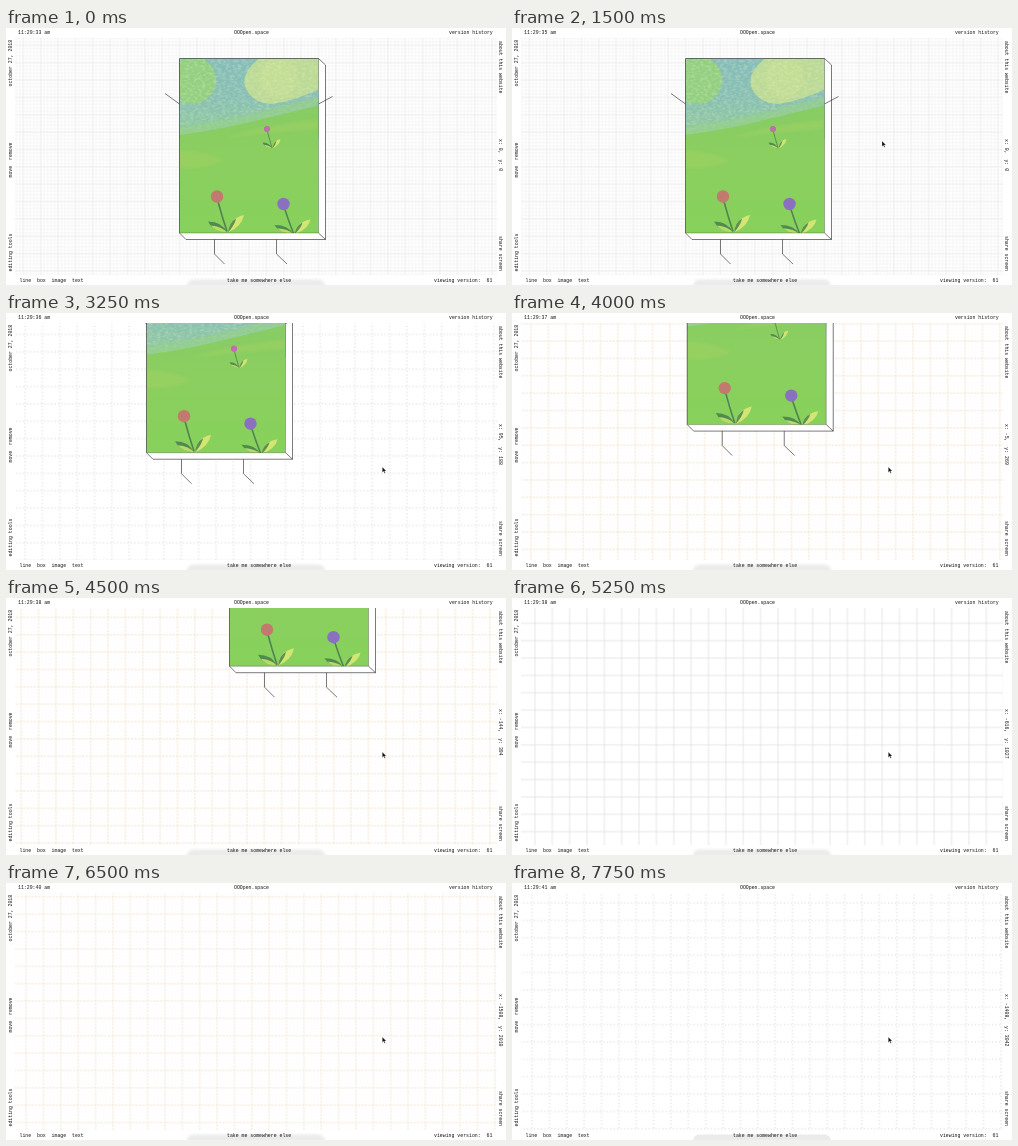
Write an HTML page that moves like this. It is 500 px wide and 257 px high and loops after 8000 ms.

```html
<!DOCTYPE html>
<html lang="en">
<head>
<meta charset="utf-8">
<title>Open space</title>
<style>
html, body { margin: 0; width: 100%; height: 100%; overflow: hidden; background: #fff; }
svg { display: block; width: 100vw; height: 100vh; }
text { font: 4.86px "Liberation Mono", "DejaVu Sans Mono", monospace; white-space: pre; fill: #111; }
.ink { fill: none; stroke: #222; stroke-width: .6; }
</style>
</head>
<body>
<svg viewBox="0 0 500 257" preserveAspectRatio="none">
  <defs>
    <clipPath id="view"><rect x="9" y="10" width="482" height="237"/></clipPath>
    <clipPath id="frame"><rect x="173.5" y="30.5" width="139" height="174.5"/></clipPath>
    <pattern id="cells" width="17.361" height="17.361" patternUnits="userSpaceOnUse">
      <path id="cellLine" d="M0 8.68H17.361M8.68 0V17.361" fill="none" stroke-width=".75"/>
    </pattern>
    <pattern id="fine" width="3.472" height="3.472" patternUnits="userSpaceOnUse">
      <path d="M0 1.736H3.472M1.736 0V3.472" fill="none" stroke="#e9e9e9" stroke-width=".5"/>
    </pattern>
    <linearGradient id="sky" x1="0" y1="0" x2="0" y2="1">
      <stop stop-color="#84bcba"/><stop offset=".5" stop-color="#88bfb4"/><stop offset="1" stop-color="#92cb9a"/>
    </linearGradient>
    <linearGradient id="hill" x1="0" y1="0" x2="0" y2="1">
      <stop stop-color="#87cc65"/><stop offset=".4" stop-color="#8bcf60"/><stop offset="1" stop-color="#87d15b"/>
    </linearGradient>
    <filter id="soft"><feGaussianBlur stdDeviation="1.8"/></filter>
    <filter id="paint"><feGaussianBlur stdDeviation=".35"/></filter>
    <filter id="grain" x="0" y="0" width="1" height="1">
      <feTurbulence type="fractalNoise" baseFrequency=".25 .4" numOctaves="3" seed="4"/>
      <feColorMatrix values="0 0 0 0 .8  0 0 0 0 .92  0 0 0 0 .6  1.8 0 0 0 -.7"/>
    </filter>
    <g id="plant" filter="url(#paint)">
      <path d="M1 5Q5 20 10 35" fill="none" stroke="#4f8450" stroke-width="1.6"/>
      <path d="M10 36Q-5 34 -9 25Q5 25 10 36" fill="#4f8a50"/>
      <path d="M10 36Q-2 35 -6 29Q5 30 10 36" fill="#b9d968"/>
      <path d="M11 36Q12 22 27 18.5Q25 30 11 36" fill="#d3e572"/>
      <path d="M11 36Q12 26 19 22Q18 28 11 36" fill="#5c9152"/>
    </g>
  </defs>

  <g clip-path="url(#view)">
    <rect id="fineGrid" width="500" height="257" fill="url(#fine)"/>
    <rect width="500" height="257" fill="url(#cells)"/>
    <g id="box">
      <path d="M173.5 30.5H312.5L319.5 37V211.5H180L173.5 205Z" fill="#fff"/>
      <g clip-path="url(#frame)">
        <rect x="173" y="30" width="140" height="80" fill="url(#sky)"/>
        <circle cx="186" cy="52" r="24" fill="#93cf81"/>
        <path d="M256 28Q235 44 239 58Q245 75 266 76Q292 72 315 60V28Z" fill="#bcd996" filter="url(#paint)"/>
        <circle cx="272" cy="50" r="20" fill="#c8df94" opacity=".6" filter="url(#soft)"/>
        <rect x="173" y="30" width="140" height="80" filter="url(#grain)" opacity=".4"/>
        <path d="M172 104Q205 100 235 93T314 73" fill="none" stroke="#96d089" stroke-width="9" opacity=".7" filter="url(#soft)"/>
        <path d="M172 107Q205 103 235 96T314 77V206H172Z" fill="url(#hill)"/>
        <g fill="#a0d164" opacity=".55" filter="url(#soft)">
          <path d="M172 122Q196 123 218 132Q196 143 172 139Z"/>
          <path d="M220 110Q250 98 312 92V101Q265 104 220 110"/>
        </g>
        <g id="plants"></g>
      </g>
      <path class="ink" d="M312.5 30.5V205H173.5" opacity=".5"/>
      <path class="ink" d="M173.5 205V30.5H312.5L319.5 37V211.5H180L173.5 205M312.5 205L319.5 211.5M159 65.5L173.5 76M312.5 76L326.5 68.5M208.5 211.5V226L218.5 236M270.5 211.5V226L281 236"/>
    </g>
  </g>

  <path id="dock" d="M181 259Q181 251.5 188 251.5H312Q319 251.5 319 259Z" fill="#ebebeb"/>
  <g id="labels"></g>
  <path id="cursor" d="M0 0V5.4L1.3 4.3L2.2 6.3L3.1 5.9L2.2 4H3.9Z" fill="#111" stroke="#fff" stroke-width=".25"/>
</svg>
<script>
const $ = id => document.getElementById(id);
const SCALE = 2.88, LOOP = 8000, STEP = 250;

function add(parent, tag, attrs, text = '') {
  const el = document.createElementNS('http://www.w3.org/2000/svg', tag);
  for (const k in attrs) el.setAttribute(k, attrs[k]);
  el.textContent = text;
  return $(parent).appendChild(el);
}

function label(text, x, y, angle = 0) {
  return add('labels', 'text', { transform: `translate(${x} ${y}) rotate(${angle})` }, text);
}

function flower(x, y, size, height, color) {
  const place = `translate(${x} ${y})`;
  add('plants', 'use', { href: '#plant', transform: `${place} scale(${size} ${height})` });
  add('plants', 'circle', { r: 6.2 * size, fill: color, transform: place, filter: 'url(#paint)' });
}

flower(261, 101, .5, .54, '#bd70aa');
flower(211, 168.5, 1, 1, '#c27a6e');
flower(277.5, 176, 1, .84, '#8b70c0');

const clock = label('', 12, 6);
label('OOOpen.space', 228, 6);
label('version history', 443, 6);
label('line  box  image  text', 13.5, 253.6);
label('take me somewhere else', 221, 253.6);
label('viewing version:  61', 428, 253.6);
label('october 27, 2018', 6, 58.5, -90);
label('move  remove', 6, 149.5, -90);
label('editing tools', 6, 243.5, -90);
label('about this website', 493, 13, 90);
const coords = label('', 493, 111, 90);
label('share screen', 493, 208, 90);

// time, x, y of the panned view
const path = [
  [2000, 0, 0], [2250, 3, 1], [2500, 12, 7], [3250, 95, 188], [4500, -144, 394],
  [5250, -616, 1027], [6500, -1508, 2010], [7750, -1408, 3042]
];
const ticks = [500, 1500, 2750, 3500, 4500, 5500, 6500, 7500];
// start, line colour, dashes, opacity of the fine grid
const styles = [
  [0, '#ececec', 'none', .75],
  [2250, '#c6c6c6', '1.1 2.372', 0],
  [4000, '#efdfc2', '2.4 1.072', .1],
  [4750, '#dedede', 'none', 0],
  [6000, '#f1e2ca', '2.4 1.072', .1],
  [7000, '#c6c6c6', '1.1 2.372', 0]
];
const cursorStops = [[750, 360.5, 60.5], [1500, 370, 113], [1750, 376.3, 154]];

const latest = (list, t) => list.filter(s => s[0] <= t).pop();

function slope(i, axis) {
  if (!i) return 0;
  const a = path[i - 1], b = path[Math.min(i + 1, path.length - 1)];
  return (b[axis] - a[axis]) / (b[0] - a[0]);
}

function pan(t, axis) {
  if (t <= path[0][0]) return 0;
  const i = Math.max(1, path.findIndex(p => p[0] >= t));
  const a = path[i - 1], b = path[i], span = b[0] - a[0];
  const u = (t - a[0]) / span, v = 1 - u;
  return v * v * (1 + 2 * u) * a[axis] + u * u * (3 - 2 * u) * b[axis]
    + span * u * v * (v * slope(i - 1, axis) - u * slope(i, axis));
}

function draw(now) {
  const t = Math.floor(now % LOOP / STEP) * STEP;
  const x = Math.round(pan(t, 1)), y = Math.round(pan(t, 2));
  const dx = -x / SCALE, dy = -y / SCALE;
  $('box').setAttribute('transform', `translate(${dx} ${dy})`);
  $('cells').setAttribute('patternTransform', `translate(${dx - 8.68} ${dy - 8.68})`);
  $('fine').setAttribute('patternTransform', `translate(${dx - 1.736} ${dy - 1.736})`);

  const [, color, dash, fine] = latest(styles, t);
  $('cellLine').setAttribute('stroke', color);
  $('cellLine').setAttribute('stroke-dasharray', dash);
  $('fineGrid').setAttribute('opacity', fine);

  clock.textContent = `11:29:${33 + ticks.filter(s => s <= t).length} am`;
  coords.textContent = `x: ${x},  y: ${y}`;

  const spot = latest(cursorStops, t);
  $('cursor').style.display = spot ? '' : 'none';
  if (spot) $('cursor').setAttribute('transform', `translate(${spot[1]} ${spot[2]})`);
  $('dock').setAttribute('filter', t >= 7750 ? 'none' : 'url(#soft)');
}

const start = performance.now();
(function loop() {
  draw(performance.now() - start);
  requestAnimationFrame(loop);
})();
</script>
</body>
</html>
```
